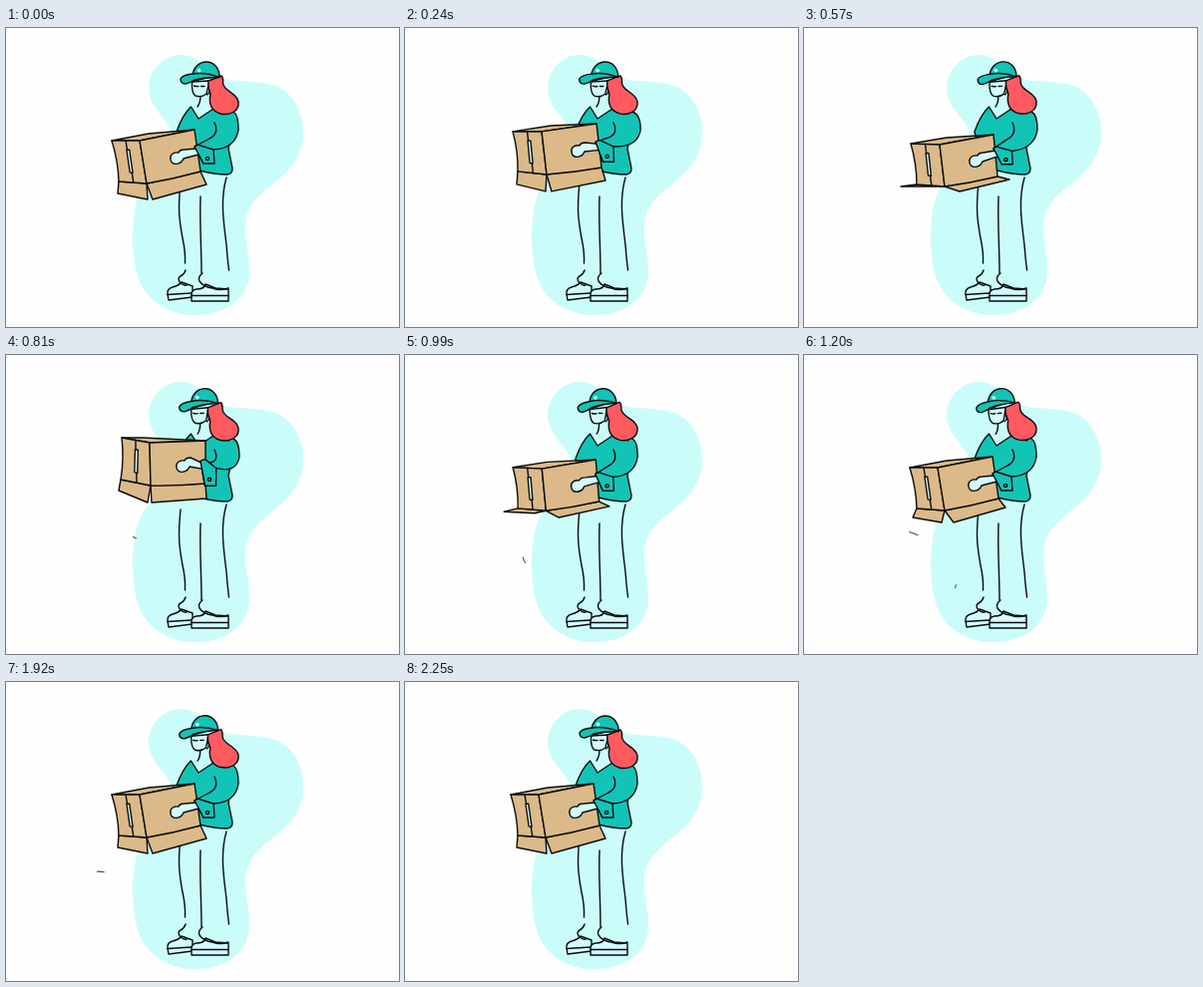
An HTML page for the animation above (2.28 s loop, 394 by 300 pixels).

```html
<!DOCTYPE html>
<html lang="en">
<head>
<meta charset="utf-8">
<title>Courier shaking a box</title>
<style>
html, body { margin: 0; width: 100%; height: 100%; overflow: hidden; background: #fefefe; }
svg { display: block; width: 100%; height: 100%; }
.ink { stroke: #080c0d; stroke-width: 1.4; stroke-linecap: round; stroke-linejoin: round; }
.line { fill: none; }
.teal { fill: #12c4b6; }
.skin { fill: #d3fbfd; }
.card { fill: #dcb988; }
.red { fill: #ff5a60; }
.bit { fill: none; stroke: #35545a; stroke-width: 1.1; stroke-linecap: round; }
</style>
</head>
<body>
<svg viewBox="0 0 394 300">
  <path fill="#cafdfa" d="M175 27C157 27 143 43 143 60C143 82 166 93 167 109C168 129 139 143 131 174C126 194 125 225 132 249C140 275 165 289 191 288C223 288 243 269 244 246C245 227 237 207 241 190C250 156 294 154 298 108C299 83 286 62 267 57C249 52 232 55 216 50C201 45 195 27 175 27Z"/>
  <g id="bits"></g>

  <g class="ink line">
    <path d="M175 155C172 184 174 194 177 211Q180 224 179.500 236"/>
    <path d="M195 169C194 198 196 219 196 246"/>
    <path d="M221 150C214 174 219 199 221 218Q222 232 223.500 243"/>
    <path class="skin" d="M162 267Q161 262 167 260Q174 258 176 255L187 259L187 270L163 273Z"/>
    <path d="M162 267.500L186 266"/>
    <path d="M180 243Q179 247 175 249Q171 251 175 256Q179 259 181 258"/>
    <path class="skin" d="M186 274V267Q186 263 191 262Q199 262 200 257L210 261L223 262V274Z"/>
    <path d="M186 268.500H223"/>
    <path d="M197 246Q192 250 194 254Q198 260 207 261Q215 264 223 261"/>
  </g>

  <path class="ink teal" d="M185.500 79Q177 87 171 104L178 135L194 143Q209 147 222 147Q227 146 227 141L223 121L230 88L208 81L193 91Z"/>

  <g id="box">
    <path class="ink card" id="flapL"/>
    <path class="ink card" id="flapR"/>
    <path class="ink card" id="top"/>
    <path class="ink card" id="left"/>
    <path class="ink card" id="right"/>
    <path class="ink line" id="seam"/>
    <path class="ink" id="slot" fill="#eafcff"/>
  </g>

  <path class="ink teal" id="arm"/>
  <path class="ink skin" id="hand"/>
  <path class="ink teal" id="cuff"/>
  <circle class="ink line" id="button" r="1.6"/>

  <g id="face">
    <path class="ink line" d="M195 68Q195 75 192 79"/>
    <path class="ink skin" d="M186.500 54Q186 66 190 68Q196 70 201 66L204 53Z"/>
    <path class="ink line" d="M188.500 58Q190.500 59 193 58.500M195.500 58.500L199 58.500"/>
  </g>
  <g id="hair">
    <path class="ink red" d="M203 53L216 48Q218 50 217.500 55C218 64 231 64 233 74C234 84 224 88 215 86C205 83 203 76 205 66Q202 59 203 53Z"/>
    <path class="ink skin" d="M203 61Q205 65 201.500 67"/>
  </g>
  <g id="cap">
    <path class="ink teal" d="M187 48C188 39 194 34 201 34C209 34 214 41 214 49Q200 49 187 54Z"/>
    <path class="ink teal" d="M187 46Q177 47 175 51Q175 56 180 56Q185 55 189 52Q200 49 214 49.500Q200 44 187 46Z"/>
    <circle cx="193.500" cy="42.500" r="1.900" fill="#c5fbf4"/>
  </g>
</svg>
<script>
const LOOP = 2280;
const $ = id => document.getElementById(id);
const set = (id, d) => $(id).setAttribute("d", d);
const pt = p => p.map(v => v.toFixed(2)).join(" ");
const poly = (...ps) => "M" + ps.map(pt).join("L") + "Z";
const add = (a, x, y) => [a[0] + x, a[1] + y];
const mix = (a, b, k) => a.map((v, i) => v + (b[i] - v) * k);

// Corner points: top left, top front, top right, top back, three below, hand.
const rest = [106,113, 134,113, 189,102, 143,106, 113,154, 141,156, 195,144, 171,130];
const mid  = [108,104, 137,104, 192,96, 146,98, 113,144, 142,147, 197,140, 173,123];
const low  = [107,116, 136,117, 190,107, 143,110, 113,157, 141,159, 194,149, 172,133];
const high = [116,83, 144,88, 200,86, 137,83, 115,125, 145,131, 200,129, 177,111];
const boxKeys = [[0, rest], [60, rest], [240, mid], [390, high], [540, low], [570, low],
  [690, mid], [810, high], [870, high], [1020, low], [1140, rest], [LOOP, rest]];

// Free flap corners, as offsets from the hinge corners.
const hang  = [-1,12, 1,16, 6,16, 6,13];
const lift  = [-1,13, -1,17, 5,17, 4,13];
const flat  = [-16,2, -13,0, 15,5, 12,3];
const drop  = [-2,11, -3,17, 1,17, 1,15];
const splay = [-4,9, -3,12, 9,12, 7,9];
const shut  = [-1,13, 2,17, 2,16, 0,14];
const flapKeys = [[0, hang], [240, lift], [390, drop], [500, flat], [570, flat], [690, splay],
  [810, drop], [900, drop], [1020, flat], [1200, splay], [1380, shut], [1500, hang],
  [1620, shut], [1860, hang], [LOOP, hang]];

const tiltKeys = [[0, [0]], [240, [-0.6]], [570, [-2]], [810, [-3]], [1200, [-5.5]],
  [1620, [-5.5]], [2250, [0]], [LOOP, [0]]];
const elbowKeys = [[0, [0]], [210, [3.4]], [390, [1]], [570, [1]], [680, [3]], [810, [1]],
  [1140, [0]], [LOOP, [0]]];

// Scraps: x, y, length, turn, bend
const scraps = [
  [[750, [134,168,3,20,0]], [810, [129,183,3,25,0]], [960, [118,202,6,60,1]],
   [1200, [152,232,3,100,0]], [1410, [146,272,2,40,0]]],
  [[1080, [126,168,5,0,0]], [1200, [110,179,9,22,0]], [1380, [88,197,6,50,1]],
   [1620, [134,218,8,-22,-3]], [1890, [120,272,3,20,0]]],
  [[1560, [106,157,2,0,0]], [1620, [98,161,3.500,5,0]], [1800, [71,176,7,35,1]],
   [2040, [118,211,7,-25,-2]], [2190, [112,268,2,15,0]]]
];

// Smooth curve through the keys, with flat tangents at turning points.
function sample(keys, t) {
  let n = 0;
  while (n < keys.length - 2 && t >= keys[n + 1][0]) n++;
  const [t0, a] = keys[n], [t1, b] = keys[n + 1];
  const h = t1 - t0, u = Math.min(1, Math.max(0, (t - t0) / h));
  const rate = (k, i) => k < 0 || k > keys.length - 2 ? 0 :
    (keys[k + 1][1][i] - keys[k][1][i]) / (keys[k + 1][0] - keys[k][0]);
  const slope = (p, q) => p * q <= 0 ? 0 : 2 * p * q / (p + q);
  return a.map((v, i) => {
    const r = rate(n, i);
    const m0 = slope(rate(n - 1, i), r) * h, m1 = slope(r, rate(n + 1, i)) * h;
    const d = b[i] - v;
    return v + u * (m0 + u * (3 * d - 2 * m0 - m1 + u * (m0 + m1 - 2 * d)));
  });
}

const pairs = list => Array.from({ length: list.length / 2 }, (_, i) => list.slice(i * 2, i * 2 + 2));

function drawBox(p, f) {
  const [a, b, c, back, d, e, g] = p;
  const face = (u, v) => mix(mix(a, b, u), mix(d, e, u), v);
  set("top", poly(a, back, c, b));
  set("left", `M${pt(a)}L${pt(b)}L${pt(e)}L${pt(d)}Q${pt(add(mix(a, d, .5), 3, 0))} ${pt(a)}Z`);
  set("right", `M${pt(b)}L${pt(c)}L${pt(g)}Q${pt(add(mix(g, e, .5), 0, 1.5))} ${pt(e)}Z`);
  set("seam", `M${pt(face(.5, 0))}L${pt(face(.5, .22))}M${pt(face(.53, .76))}L${pt(face(.53, 1))}`);
  set("slot", poly(face(.48, .22), face(.58, .22), face(.56, .77), face(.46, .76)));
  set("flapL", poly(d, e, add(e, ...f[1]), add(d, ...f[0])));
  set("flapR", poly(e, g, add(g, ...f[3]), add(e, ...f[2])));
}

function drawArm(h, bulge) {
  const dx = h[0] - 171, dy = h[1] - 130;
  const follow = (x, y, k) => [x + dx * k, y + dy * k];
  const a = [189 + dx, 119 + dy * .65];
  const b = follow(208, 122, .45), c = follow(209, 136, .25), d = follow(198, 136, .25);
  const x = 233 + bulge;
  set("arm", `M209 95Q214 106 ${pt(follow(204, 111, .15))}L${pt(a)}L${pt(d)}L${pt(b)}` +
    `Q${x - 3} ${121 + dy * .1} ${x} 102Q${x} 87 228 84`);
  set("cuff", `M${pt(a)}Q${pt(add(a, 3, -3))} ${pt(add(a, 6, -1))}L${pt(b)}L${pt(c)}` +
    `L${pt(d)}Q${pt(mix(a, d, .45))} ${pt(a)}Z`);
  const [bx, by] = follow(202, 131, .32);
  $("button").setAttribute("cx", bx);
  $("button").setAttribute("cy", by);
  const w = add(a, 2, 2), v = add(a, 4, 8);
  set("hand", `M${pt(w)}L${pt(add(h, 8, -8))}Q${pt(add(h, 3, -8))} ${pt(add(h, 2, -5))}` +
    `C${pt(add(h, -4, -6))} ${pt(add(h, -7, -2))} ${pt(add(h, -6, 2))}` +
    `C${pt(add(h, -5, 8))} ${pt(add(h, 4, 8))} ${pt(add(h, 7, 1))}L${pt(v)}`);
}

const bits = scraps.map(() => {
  const el = document.createElementNS("http://www.w3.org/2000/svg", "path");
  el.setAttribute("class", "bit");
  return $("bits").appendChild(el);
});

function drawBits(t) {
  scraps.forEach((keys, i) => {
    const el = bits[i];
    const live = t >= keys[0][0] && t <= keys[keys.length - 1][0];
    el.style.display = live ? "" : "none";
    if (!live) return;
    const [x, y, len, turn, bend] = sample(keys, t);
    el.setAttribute("d", `M${-len / 2} 0Q0 ${bend} ${len / 2} 0`);
    el.setAttribute("transform", `translate(${x} ${y}) rotate(${turn})`);
  });
}

function draw(t) {
  const p = pairs(sample(boxKeys, t));
  drawBox(p, pairs(sample(flapKeys, t)));
  drawArm(p[7], sample(elbowKeys, t)[0]);
  const tilt = sample(tiltKeys, t)[0];
  const turn = (id, k) => $(id).setAttribute("transform", `rotate(${tilt * k} 196 76)`);
  turn("cap", 1);
  turn("face", .8);
  turn("hair", .45);
  drawBits(t);
}

const start = performance.now();
function tick() {
  draw((performance.now() - start) % LOOP);
  requestAnimationFrame(tick);
}
draw(0);
requestAnimationFrame(tick);
</script>
</body>
</html>
```
